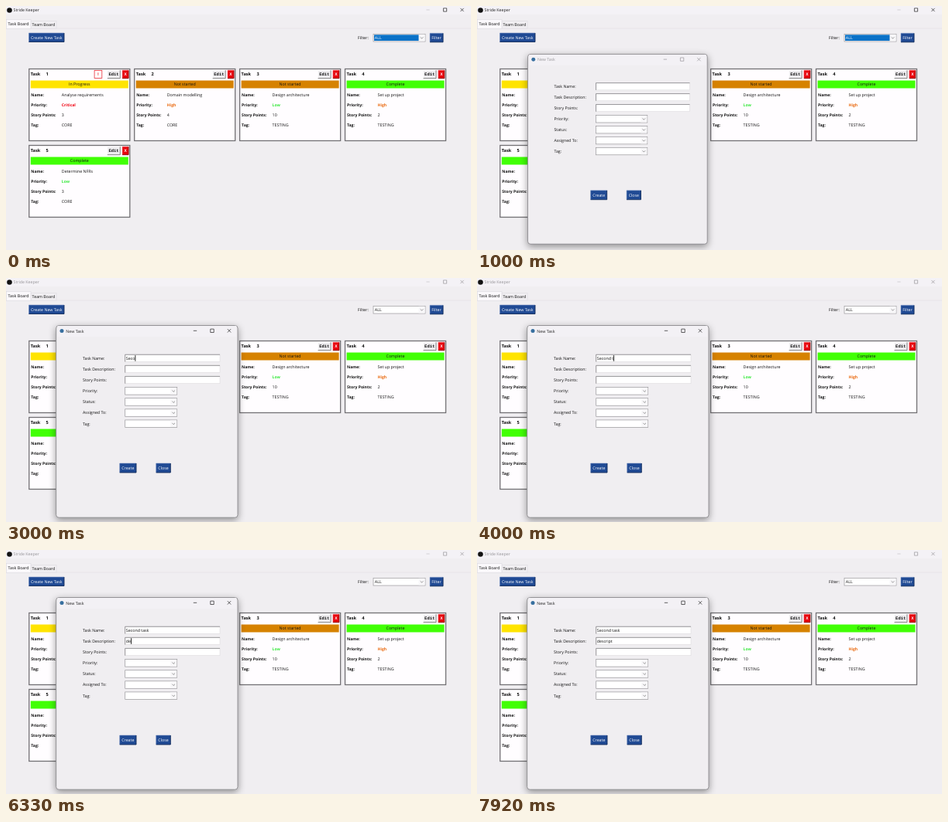
These frames come from a looping animation (600 px wide and 316 px high, 8000 ms). An HTML page:

```html
<!DOCTYPE html>
<html lang="en">
<head>
<meta charset="utf-8">
<title>Task board</title>
<style>
  html, body { margin: 0; width: 100%; height: 100%; overflow: hidden; background: #f0eef1; }
  svg { display: block; width: 600px; height: 316px; }
  text { font: 5.3px "Open Sans", sans-serif; text-rendering: geometricPrecision; white-space: pre; }
  .bold { font-weight: 700; font-size: 5.1px; }
  .head { font-weight: 700; font-size: 5.65px; }
  .mono { font: 700 5.5px "Liberation Mono", monospace; }
  .mid { text-anchor: middle; }
  #dialog .frame { filter: drop-shadow(0 3px 5px #0006); }
</style>
</head>
<body>
<svg id="stage" viewBox="0 0 600 316"></svg>
<script>
const LOOP = 8000, STEP = 1000 / 12;
const STATUS = { 'In Progress': '#ffe400', 'Not started': '#d68200', 'Complete': '#41ff05' };
const PRIORITY = { Critical: '#f00010', High: '#ea6a10', Low: '#35e83a' };
const TASKS = [
  ['In Progress', 'Analyse requirements', 'Critical', 3, 'CORE'],
  ['Not started', 'Domain modelling', 'High', 4, 'CORE'],
  ['Not started', 'Design architecture', 'Low', 10, 'TESTING'],
  ['Complete', 'Set up project', 'High', 2, 'TESTING'],
  ['Complete', 'Determine NFRs', 'Low', 3, 'CORE'],
];

// Text is placed by its vertical middle.
const text = (x, cy, s, cls = '', fill = '#111', id = '') =>
  `<text x="${x}" y="${cy + 1.9}" class="${cls}" fill="${fill}" id="${id}">${s}</text>`;
const rect = (x, y, w, h, fill, extra = '') =>
  `<rect x="${x}" y="${y}" width="${w}" height="${h}" fill="${fill}" ${extra}/>`;
const line = (d, stroke, width = .6, extra = '') =>
  `<path d="${d}" fill="none" stroke="${stroke}" stroke-width="${width}" ${extra}/>`;

function raised(x, y, w, h, fill, light, dark) {
  return rect(x, y, w, h, fill) +
    line(`M${x} ${y + h}V${y}H${x + w}`, light) +
    line(`M${x} ${y + h}H${x + w}V${y}`, dark, .9);
}

function button(x, y, w, h, label) {
  return raised(x, y, w, h, '#204a94', '#6f8cc0', '#102a58') +
    text(x + w / 2, y + h / 2, label, 'mid', '#fff');
}

function entry(x, y, w, h) {
  return rect(x, y, w, h, '#fff', 'stroke="#dcdadd" stroke-width=".6"') +
    line(`M${x} ${y + h}V${y}H${x + w}`, '#858387', .8);
}

function combo(x, y, w, h) {
  const cx = x + w - 4.5, cy = y + h / 2;
  return rect(x, y, w, h, '#fff', 'stroke="#98969a" stroke-width=".7"') +
    rect(x + w - 8.5, y + .5, 8, h - 1, '#f8f7f9') +
    line(`M${cx - 1.8} ${cy - .8}l1.8 1.8l1.8 -1.8`, '#555');
}

function windowControls(x, cy, r) {
  return line(`M${x - 22 - r} ${cy}h${2 * r}`, 'currentColor', .7, 'class="minimise"') +
    line(`M${x - r} ${cy - r}h${2 * r}v${2 * r}h${-2 * r}z` +
      `M${x + 22 - r} ${cy - r}l${2 * r} ${2 * r}m0 ${-2 * r}l${-2 * r} ${2 * r}`, 'currentColor', .7);
}

function card([status, name, priority, points, tag], i) {
  const rows = [['Name:', name], ['Priority:', priority], ['Story Points:', points], ['Tag:', tag]];
  let out = rect(.5, .5, 130, 93, '#fffdff', 'stroke="#727074" stroke-width="1.3"') +
    text(2.5, 7.5, 'Task', 'head') + text(22.3, 7.5, i + 1, 'head') +
    raised(101.5, 2.2, 16.5, 10.5, '#efedf0', '#fff', '#777') + text(109.7, 7.3, 'Edit', 'mono mid') +
    raised(120.8, 2.2, 8, 10.5, '#e8000c', '#f46068', '#800') + text(124.8, 7.3, 'X', 'mono mid', '#fff') +
    rect(2.5, 15.5, 126, 10, STATUS[status]) + text(65.5, 20.5, status, 'mid');
  if (priority === 'Critical')
    out += rect(84.8, 2.5, 9.7, 10, '#fff', 'stroke="#e8303a" stroke-width=".8"') +
      text(89.6, 7.4, '!', 'mono mid', '#e8000c');
  rows.forEach(([label, value], row) => {
    const cy = 33.6 + row * 13.1, isPriority = row === 1;
    out += text(3, cy, label, 'bold') +
      text(42.5, cy, value, isPriority ? 'bold' : '', isPriority ? PRIORITY[value] : '#111');
  });
  return `<g transform="translate(${29.3 + i % 4 * 135.9} ${81 + (i >> 2) * 99})">${out}</g>`;
}

function board() {
  return rect(0, 0, 600, 316, '#f0eef1') + rect(0, 0, 600, 11, '#f4f2f6') +
    `<g id="titlebar"><circle cx="4.5" cy="5.5" r="3.3" fill="#111"/>` +
    text(9.5, 5.5, 'Stride Keeper', '', 'currentColor') + windowControls(566.5, 5, 2.1) + '</g>' +
    line('M0 29H600', '#e2e0e4', .7) +
    rect(32, 19.5, 33, 9.5, '#f1eff2', 'stroke="#dddbdf" stroke-width=".6"') +
    rect(.5, 17.5, 31.5, 12, '#faf8fb', 'stroke="#dddbdf" stroke-width=".6"') +
    text(2.6, 23.5, 'Task Board') + text(33.6, 24.5, 'Team Board') +
    button(29.5, 35, 45.5, 11.5, 'Create New Task') + text(454, 41.3, 'Filter:') +
    combo(474, 36.3, 67, 9.7) + rect(475, 37.3, 57.5, 7.7, '#0a72c8', 'id="selection"') +
    text(475.8, 41.2, 'ALL', '', 'currentColor', 'filterValue') +
    button(547, 35.3, 17, 11.5, 'Filter') + TASKS.map(card).join('');
}

function dialog() {
  const labels = ['Task Name:', 'Task Description:', 'Story Points:', 'Priority:', 'Status:', 'Assigned To:', 'Tag:'];
  const fields = labels.map((label, i) => {
    const cy = 104 + i * 14.1;
    return text(99, cy, label) + (i < 3 ? entry(153.7, cy - 4.8, 122.3, 9.3) : combo(153.7, cy - 4.7, 67, 9.5));
  });
  return `<g id="dialog">` +
    rect(64.7, 61.5, 234.3, 248.7, '#f0eef1', 'class="frame" rx="3.5" stroke="#8b898d" stroke-width=".9"') +
    line('M66.5 69H297.2', '#f3f1f5', 14) +
    '<circle cx="72" cy="68.5" r="2.5" fill="#376f9f"/>' +
    text(77.3, 68.7, 'New Task', '', 'currentColor') + windowControls(266, 68.3, 2.2) +
    fields.join('') + button(146.7, 240, 21.3, 12, 'Create') + button(193.7, 240, 18.6, 12, 'Close') +
    text(154.8, 104, '', '', '#111', 'name') + text(154.8, 118.1, '', '', '#111', 'description') +
    rect(0, 0, .9, 7.6, '#111', 'id="caret"') + '</g>';
}

const $ = id => document.getElementById(id);
$('stage').innerHTML = board() + dialog();

const typed = (s, t, start, interval) =>
  s.slice(0, Math.max(0, Math.floor((t - start) / interval) + 1));

function draw(time) {
  const t = Math.floor(time / STEP + .01) * STEP + 1;
  const focused = t > 1080, inDescription = t > 5330;

  // The dialog fades and grows into place.
  const open = Math.min(1, Math.max(0, (t - 833.4) / 250));
  const scale = 1 - .1035 * (1 - open) ** 2;
  $('dialog').setAttribute('transform', `translate(140 140) scale(${scale}) translate(-140 -140)`);
  $('dialog').setAttribute('opacity', t < 900 ? 0 : Math.min(1, open * 1.5));

  $('titlebar').style.color = focused ? '#98969a' : '#222';
  $('dialog').style.color = focused ? '#222' : '#98969a';
  document.querySelector('#titlebar .minimise').style.color = '#c4c2c6';
  $('selection').style.display = focused ? 'none' : '';
  $('filterValue').style.color = focused ? '#111' : '#fff';

  $('name').textContent = typed('Second task', t, 2200, 240);
  $('description').textContent = typed('descript', t, 5660, 310);

  const field = inDescription ? $('description') : $('name');
  const blink = (t - (inDescription ? 5330 : 950)) % 900;
  const caret = $('caret');
  caret.style.display = focused && blink < 600 ? '' : 'none';
  caret.setAttribute('x', 154.3 + (field.textContent ? field.getComputedTextLength() + .5 : 0));
  caret.setAttribute('y', inDescription ? 114.2 : 100.1);
}

const startTime = performance.now();
function tick() {
  draw((performance.now() - startTime) % LOOP);
  requestAnimationFrame(tick);
}
tick();
</script>
</body>
</html>
```
